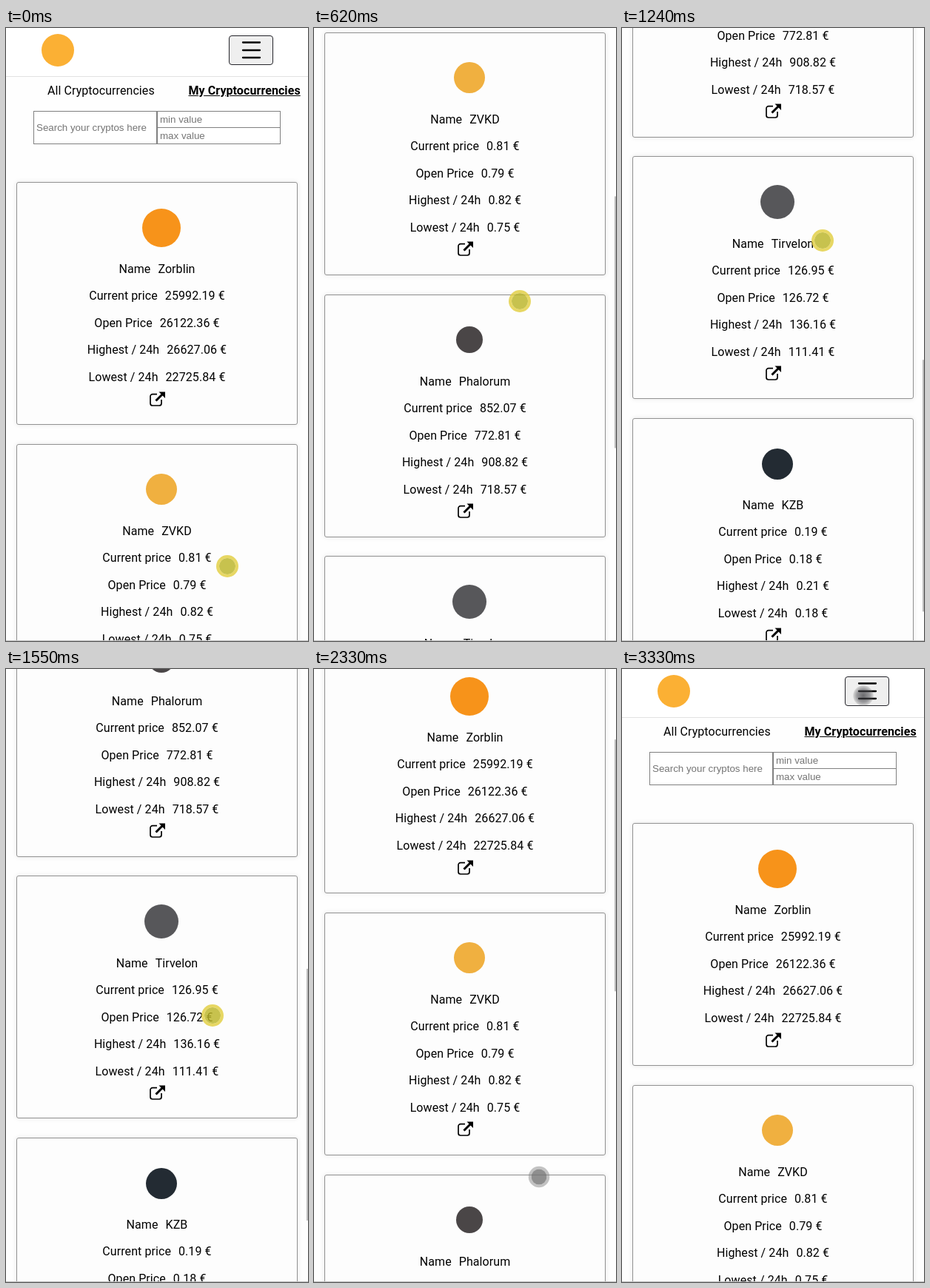
Write an HTML page that moves like this. It is 408 px wide and 828 px high and loops after 3.48 s.

```html
<!DOCTYPE html>
<html lang="en">
<head>
<meta charset="utf-8">
<title>My Cryptocurrencies</title>
<style>
  html, body { margin: 0; width: 100%; height: 100%; overflow: hidden; background: #fefefe; }
  #stage {
    position: relative; width: 408px; height: 828px; overflow: hidden; background: #fefefe;
    font: 16px/19px Roboto, sans-serif; letter-spacing: .08px; color: #000;
  }
  #stage div, #stage svg { position: absolute; box-sizing: border-box; white-space: nowrap; }
  #page { left: 0; top: 0; width: 408px; height: 2010px; }
  #header { left: 0; top: 0; width: 408px; height: 66px; border-bottom: 1px solid #e2e2e2; background: #fff; }
  #menu { left: 301px; top: 10px; width: 60px; height: 40px; border: 1.5px solid #24242a; border-radius: 4px; background: #efefef; }
  .dot { border-radius: 50%; }
  .field {
    border: 1px solid #808080; background: #fff; color: #757575; padding-left: 3px;
    font: 13.333px "Liberation Sans", Arial, sans-serif; letter-spacing: 0;
  }
  .card {
    left: 14px; width: 380px; height: 328px; border: 1px solid #929292; border-radius: 3px;
    background: #fdfdfd; box-shadow: 0 0 6px rgba(0, 0, 0, .1);
  }
  .row { left: 14px; width: 380px; display: flex; justify-content: center; gap: 10px; }
  #thumb { right: 0; top: 0; width: 2px; height: 340px; background: #bcbcbc; }
  #edge { left: 0; top: 827px; width: 408px; height: 1px; background: #c4c4c4; }
  #touch { left: -15px; top: -15px; width: 30px; height: 30px; border-radius: 50%; border: 4px solid; background-clip: padding-box; }
  #touch.press { border-color: rgba(226, 205, 60, .8); background-color: rgba(187, 181, 40, .82); }
  #touch.idle { border-color: rgba(135, 135, 135, .5); background-color: rgba(115, 115, 115, .8); transform-origin: center; }
  #touch.tap {
    border: 0;
    background: radial-gradient(closest-side, rgba(50, 50, 55, .7), rgba(80, 80, 85, .55) 60%, rgba(120, 120, 120, .25) 92%, transparent);
  }
</style>
</head>
<body>
<div id="stage">
  <div id="page">
    <div id="header"></div>
    <div id="menu"></div>
    <svg width="408" height="66" style="left:0;top:0">
      <path d="M320 19.5h23M320 30h23M320 40h23" stroke="#000" stroke-width="2.3" stroke-linecap="round"/>
    </svg>
    <div style="left:56px;top:75px">All Cryptocurrencies</div>
    <div style="left:246.5px;top:75px;font-weight:700;text-decoration:underline">My Cryptocurrencies</div>
  </div>
  <div id="edge"></div>
  <div id="thumb"></div>
  <div id="touch"></div>
</div>
<script>
const LOOP = 3480;
const PITCH = 353.8;
const ROW_TOPS = [108.2, 144.2, 181.2, 217.2, 254.2];
const LABELS = ['Name', 'Current price', 'Open Price', 'Highest / 24h', 'Lowest / 24h'];

// name, prices, badge colour, badge radius
const COINS = [
  ['Zorblin', '25992.19 26122.36 26627.06 22725.84', '#f7931a', 26],
  ['ZVKD', '0.81 0.79 0.82 0.75', '#f0b040', 21],
  ['Phalorum', '852.07 772.81 908.82 718.57', '#4a4647', 18],
  ['Tirvelon', '126.95 126.72 136.16 111.41', '#57575a', 23],
  ['KZB', '0.19 0.18 0.21 0.18', '#232b33', 21],
];

// time, scroll, touch x, touch y
const STEPS = [
  [0, 0, 299, 727], [150, 55, 296, 657], [300, 218, 289, 494], [470, 396, 282, 410],
  [620, 556, 278, 369], [760, 704, 276, 342], [920, 866, 273, 310], [1090, 1012, 271, 288],
  [1240, 1096, 271, 287], [1400, 1120, 273, 335], [1550, 990, 279, 468], [1720, 816, 291, 630],
  [1870, 664, 301, 682], [2010, 524.5, 304, 689], [2180, 344, 304, 690], [2330, 233, 304, 686],
  [2500, 100, 303, 676], [2650, 5, 303, 657], [2800, 0, 312, 322], [3330, 0, 326, 36],
];

const $ = id => document.getElementById(id);
const page = $('page'), thumb = $('thumb'), touch = $('touch');

function add(cls, css, text = '') {
  const el = document.createElement('div');
  el.className = cls;
  el.style.cssText = css;
  el.textContent = text;
  page.append(el);
  return el;
}

const box = (x, y, w, h) => `left:${x}px;top:${y}px;width:${w}px;height:${h}px;`;

const disc = (x, y, r, color) =>
  add('dot', box(x - r, y - r, 2 * r, 2 * r) + `background:${color}`);

const field = (x, y, w, h, text) =>
  add('field', box(x, y, w, h) + `line-height:${h - 2}px`, text);

function addCard([name, prices, color, radius], i) {
  const top = 208 + PITCH * i;
  add('card', `top:${Math.round(top)}px`);
  disc(209.5, Math.round(top + 61.5), radius, color);
  const values = [name, ...prices.split(' ').map(p => p + ' €')];
  values.forEach((value, k) => {
    const row = add('row', `top:${Math.round(top + ROW_TOPS[k])}px`);
    for (const text of [LABELS[k], value]) {
      row.append(Object.assign(document.createElement('span'), { textContent: text }));
    }
  });
  page.insertAdjacentHTML('beforeend',
    `<svg width="22" height="20" style="left:194px;top:${Math.round(top + 282.6)}px">
      <path d="M10 3.6H4a3 3 0 0 0-3 3V16a3 3 0 0 0 3 3h9a3 3 0 0 0 3-3v-5" fill="none" stroke="#000" stroke-width="1.7"/>
      <path d="M8.5 12.5L17.5 3.5" stroke="#000" stroke-width="3"/>
      <path d="M12.5 .5H21V9z"/>
    </svg>`);
}

disc(70, 30, 22, '#fbb034');
field(37, 112, 167, 45, 'Search your cryptos here');
field(204, 112, 167, 23, 'min value');
field(204, 134, 167, 23, 'max value');
COINS.forEach(addCard);

function draw() {
  const now = performance.now() % LOOP;
  const [time, scroll, x, y] = STEPS.findLast(step => step[0] <= now);
  page.style.transform = `translateY(${-Math.round(scroll)}px)`;
  thumb.style.transform = `translateY(${scroll * 0.409}px)`;
  thumb.style.visibility = time > 0 && time < 3330 ? 'visible' : 'hidden';
  touch.className = time < 1870 ? 'press' : time < 3330 ? 'idle' : 'tap';
  touch.style.transform = `translate(${x}px, ${y}px)` + (time < 1870 ? '' : ' scale(.95)');
  requestAnimationFrame(draw);
}
draw();
</script>
</body>
</html>
```
